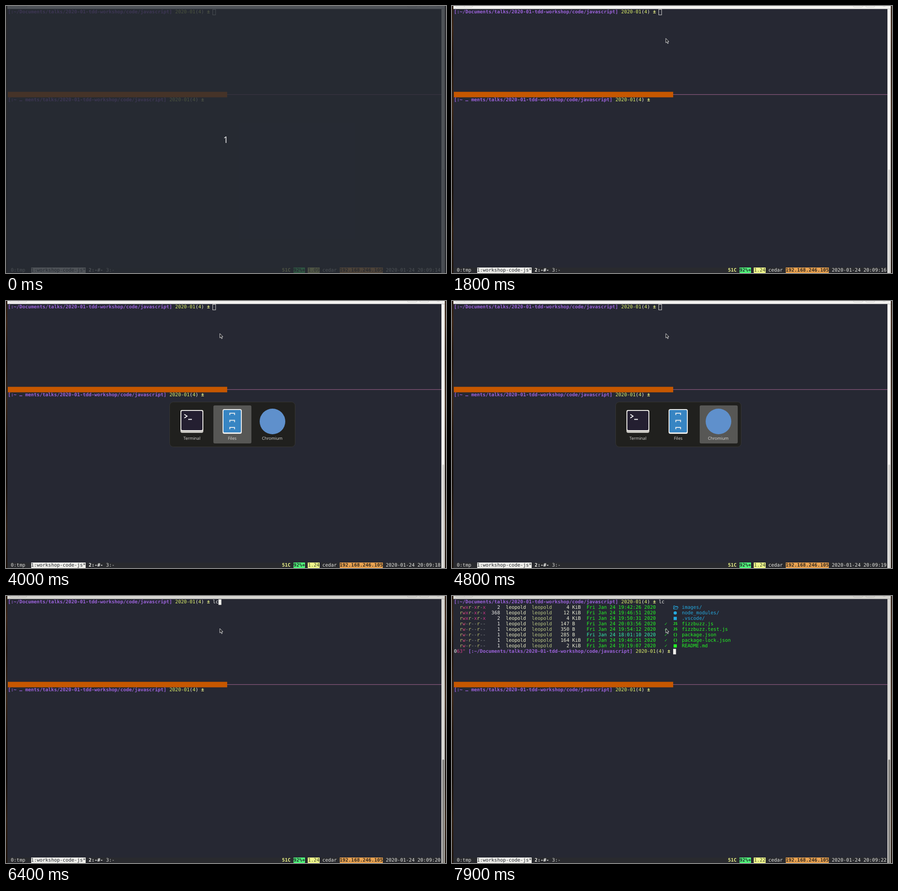
Recreate the animation shown at these times as an HTML page. Size 961 by 583 pixels, loop 8000 ms.

```html
<!DOCTYPE html>
<html lang="en">
<head>
<meta charset="utf-8">
<title>Terminal session</title>
<style>
  html, body { margin: 0; width: 100%; height: 100%; overflow: hidden; background: #262833; }
  #stage { position: absolute; left: 0; top: 0; width: 961px; height: 583px; overflow: hidden; background: #262833; }
  #stage div, #stage span, #stage svg { position: absolute; }
  .layer { left: 0; top: 0; width: 961px; height: 583px; }
  .cell {
    height: 12px; line-height: 12px; white-space: pre; color: #eeeeea;
    font-family: "DejaVu Sans Mono", "Noto Sans Mono", monospace; font-size: 10.465px;
    text-rendering: geometricPrecision;
  }
  .bold { font-weight: bold; }
  .wood { top: 0; height: 583px; background: linear-gradient(#2b1b10, #3b2415 8%, #20130b 20%, #3a2516 38%, #1d120b 52%, #140d09 68%, #2e1d10 84%, #1b110a); }
  #pick { fill: #575755; }
  .label { top: 293px; width: 83px; text-align: center; color: #deddda; font: 9.1px/13px "Open Sans", "Noto Sans", sans-serif; text-rendering: geometricPrecision; }
  #dim { background: rgba(38,43,51,.8); }
  #count { left: 440px; top: 278px; width: 80px; text-align: center; color: #f4f4f4; font: 19.5px/28px "Open Sans", "Noto Sans", sans-serif; }
</style>
</head>
<body>
<div id="stage">
  <div class="wood" style="left:0;width:3px"></div>
  <div class="wood" style="left:958px;width:3px"></div>
  <svg class="layer">
    <rect id="head" x="3" width="955.5" height="6.5"/>
    <g fill="none" stroke="#000" stroke-opacity=".13">
      <rect x="8.5" y="-9.5" width="37" height="12" rx="3"/>
      <path d="M27 0V2"/>
      <rect x="876.5" y="-9.5" width="21" height="12" rx="3"/>
      <rect x="903.5" y="-9.5" width="20" height="12" rx="3"/>
      <circle cx="944" cy="-3" r="4"/>
    </g>
    <rect id="trough" x="951" y="6.5" width="7.4" height="577"/>
    <rect id="thumb" x="953" y="357" width="4" height="240" rx="2"/>
    <rect x="4" y="187.4" width="479.1" height="12" fill="#c65700"/>
    <rect x="483" y="192.8" width="468" height="1" fill="#a3648f"/>
    <rect x="3" y="571" width="948" height="12" fill="#292a2e"/>
  </svg>
  <div id="text"></div>
  <svg class="layer"><rect id="cursor" width="6.3" height="12"/></svg>
  <div id="overview">
    <svg class="layer">
      <rect x="357.5" y="220.5" width="274" height="98" rx="8" fill="#20201e" stroke="#363634"/>
      <rect id="pick" y="228" width="83" height="83" rx="3"/>
      <rect x="381" y="238" width="50" height="50" rx="4" fill="#c5c3be"/>
      <rect x="381" y="238" width="50" height="46" rx="4" fill="#eceae6"/>
      <rect x="383" y="240" width="46" height="42" rx="2.5" fill="#241f31"/>
      <path d="M389.5 247.5l6 4-6 4M398 258.5h8" fill="none" stroke="#fff" stroke-width="1.8"/>
      <rect x="473" y="236" width="42" height="54" rx="4" fill="#eeeeec"/>
      <rect x="475" y="238" width="38" height="49" rx="2" fill="#3785c3"/>
      <path d="M488.8 249v-4h10.4v4M488.8 264.5v-4h10.4v4M488.8 280v-4h10.4v4" fill="none" stroke="#dce5ec" stroke-width="2"/>
      <circle cx="582" cy="263" r="28" fill="#5f90cc"/>
    </svg>
    <div class="label" style="left:364.5px">Terminal</div>
    <div class="label" style="left:452.5px">Files</div>
    <div class="label" style="left:540px">Chromium</div>
  </div>
  <svg id="pointer" width="10" height="15" viewBox="-1 -1 10 15">
    <path d="M0 0V9.6L2.2 7.7 3.9 11.4 5.5 10.7 3.9 7.1H6.8Z" fill="#15161a" stroke="#f2f2f2" stroke-width=".9"/>
  </svg>
  <div id="dim" class="layer"></div>
  <div id="count">1</div>
</div>
<script>
const LOOP = 8000, CELL = 6.3, ROW = 12;
const $ = id => document.getElementById(id);
const colX = c => 4.2 + c * CELL;
const rowY = r => 7 + r * ROW;

const PURPLE = '#9b62da', LIME = '#dcf06a', GREEN = '#24f824', BLUE = '#25a9df', DARK = '#22252b';

function put(parent, row, col, text, color, opts = {}) {
  const el = document.createElement('span');
  el.className = 'cell' + (opts.bold ? ' bold' : '');
  el.textContent = text;
  el.style.left = colX(col) + 'px';
  el.style.top = rowY(row) + 'px';
  if (color) el.style.color = color;
  if (opts.bg) {
    el.style.background = opts.bg;
    el.style.width = text.length * CELL + 'px';
  }
  parent.append(el);
  return el;
}

function group() {
  const el = document.createElement('div');
  $('text').append(el);
  return el;
}

function prompt(parent, row, col, path) {
  put(parent, row, col, path, PURPLE, { bold: true });
  col += path.length + 1;
  put(parent, row, col, '2020-01', LIME);
  put(parent, row, col + 7, '(', '#f0f0e0');
  put(parent, row, col + 8, '4', LIME);
  put(parent, row, col + 9, ')', '#f0f0e0');
  put(parent, row, col + 11, '±', '#f1fa8c', { bold: true });
}

const TAIL = '/talks/2020-01-tdd-workshop/code/javascript]';
const HOME = '[:~/Documents' + TAIL;
const base = group(), listing = group(), nextLine = group();

prompt(base, 0, 0, HOME);
prompt(base, 16, 0, '[:~ … ments' + TAIL);
const typed = put(base, 0, 71, '');

// Status line
const status = (col, text, color, opts) => put(base, 47, col, text, color, opts);
status(1, '0:tmp', '#dededa');
status(8, '1:workshop-code-js*', DARK, { bg: '#efefeb' });
status(28, '2:-#-', '#f4f4f0', { bold: true });
status(34, '3:-', '#dededa');
status(95, '51C', '#f1fa8c', { bold: true });
status(99, '92%+', DARK, { bg: '#50fa7b', bold: true });
const load = status(104, '1.09', '#3a3d2b', { bg: '#f1fa8c' });
status(109, 'cedar', '#e6e6e2');
status(115, '192.168.246.105', '#33291f', { bg: '#e9a250', bold: true });
const clock = status(131, '2020-01-24 20:09:14', '#e6e6e2');

// Directory listing: links, size, unit, time, icon, name
const FILES = [
  [2, 4, 'KiB', '19:42:26', 'folder', 'images/'],
  [368, 12, 'KiB', '19:46:51', 'dot', 'node_modules/'],
  [2, 4, 'KiB', '19:50:31', 'square', '.vscode/'],
  [1, 147, 'B', '20:03:56', 'JS', 'fizzbuzz.js'],
  [1, 350, 'B', '19:54:12', 'JS', 'fizzbuzz.test.js'],
  [1, 285, 'B', '18:01:10', '{}', 'package.json'],
  [1, 164, 'KiB', '19:46:51', '{}', 'package-lock.json'],
  [1, 2, 'KiB', '19:19:07', 'square', 'README.md']
];
const MODE = { r: '#c9cc74', w: '#d4507e', x: '#d3368e', '-': '#8a9090' };
const SHAPES = {
  folder: '<path d="M1 9.5V2.5h3l1 1.2h4.5V5M1 9.5L3 5h8L9.3 9.5Z" fill="none" stroke="#25a9df"/>',
  dot: '<circle cx="4.5" cy="6" r="3.6" fill="#25a9df"/>',
  square: '<rect x="1" y="2.5" width="7" height="7" fill="currentColor"/>'
};

function icon(row, kind, color) {
  if (!SHAPES[kind]) {
    put(listing, row, 76, kind, color, { bold: true }).style.fontSize = '8px';
    return;
  }
  const el = put(listing, row, 76, '', color);
  el.innerHTML = `<svg width="12" height="12" style="left:0;top:0">${SHAPES[kind]}</svg>`;
}

FILES.forEach(([links, size, unit, time, kind, name], i) => {
  const row = i + 1, isDir = name.endsWith('/');
  const color = isDir ? BLUE : GREEN;
  [...(isDir ? 'rwxr-xr-x' : 'rw-r--r--')].forEach((ch, k) => put(listing, row, 2 + k, ch, MODE[ch]));
  put(listing, row, 13, String(links).padStart(3));
  put(listing, row, 18, 'leopold', '#eef0c8');
  put(listing, row, 27, 'leopold', '#bcc884');
  put(listing, row, 37, String(size).padStart(3), '#eef0d8');
  put(listing, row, 41, unit, '#eef0d8');
  put(listing, row, 46, `Fri Jan 24 ${time} 2020`, time < '19' ? '#34f0b0' : GREEN);
  if (!isDir) put(listing, row, 73, '✓', '#22cf2a');
  icon(row, kind, color);
  put(listing, row, 79, name, color);
});

put(nextLine, 9, 0, '0');
put(nextLine, 9, 1, '63°', '#cf3b86');
prompt(nextLine, 9, 5, HOME);

// Step tables: [start time, value, ...]
const SECONDS = [[0, 14], [800, 15], [1800, 16], [2800, 17], [3800, 18], [4800, 19], [5900, 20], [6900, 21], [7900, 22]];
const LOADS = [[0, '1.09'], [800, '1.24'], [6900, '1.22']];
const POINTER = [[0, -50, -50], [1100, 228, 33], [1200, 395, 75], [1300, 452, 74], [1500, 465, 72], [1800, 467, 70.7], [3600, 467, 71]];
const PICK = [[0, -1], [4000, 1], [4800, 2], [5000, 0], [5200, -1]];
const TYPED = [[0, ''], [6300, 'l'], [6400, 'lc']];
const CURSOR = [
  [0, 71, 0, 'hollow'], [5200, 71, 0, 'solid'], [5700, 71, 0, 'off'], [6300, 72, 0, 'solid'],
  [6400, 73, 0, 'solid'], [6700, 0, 1, 'solid'], [7000, 0, 9, 'solid'],
  [7200, 76, 9, 'solid'], [7500, 76, 9, 'off'], [7800, 76, 9, 'solid']
];
// Header, trough and thumb colours as the window gains focus
const FOCUS = [
  [0, '#f3f2f0', '#f1f0ee', '#d0cfcc'], [5200, '#dddcd8', '#e5e4e1', '#81807d'],
  [5300, '#d8d7d3', '#dcdbd8', '#7f7e7b'], [5400, '#d5d4d0', '#d7d6d2', '#7e7d7a']
];

const at = (steps, t) => steps.reduce((last, s) => s[0] <= t ? s : last).slice(1);
const show = (el, on) => { el.style.display = on ? '' : 'none'; };

function render(t) {
  const [x, y] = at(POINTER, t);
  $('pointer').style.transform = `translate(${x - 1}px, ${y - 1}px)`;

  const [pick] = at(PICK, t);
  show($('overview'), pick >= 0);
  $('pick').setAttribute('x', 365 + 88 * pick);

  const [col, row, mode] = at(CURSOR, t);
  const cursor = $('cursor');
  cursor.setAttribute('x', colX(col));
  cursor.setAttribute('y', rowY(row) + .4);
  cursor.style.fill = mode === 'solid' ? '#efefeb' : 'none';
  cursor.style.stroke = mode === 'hollow' ? '#d9d9d6' : 'none';

  const [head, trough, thumb] = at(FOCUS, t);
  $('head').style.fill = head;
  $('trough').style.fill = trough;
  $('thumb').style.fill = thumb;

  typed.textContent = at(TYPED, t)[0];
  load.textContent = at(LOADS, t)[0];
  clock.textContent = '2020-01-24 20:09:' + at(SECONDS, t)[0];

  show(listing, t >= 7000);
  show(nextLine, t >= 7200);
  show($('dim'), t < 500);
  show($('count'), t < 500);
}

const start = performance.now();
function tick() {
  render((performance.now() - start) % LOOP);
  requestAnimationFrame(tick);
}
tick();
</script>
</body>
</html>
```
